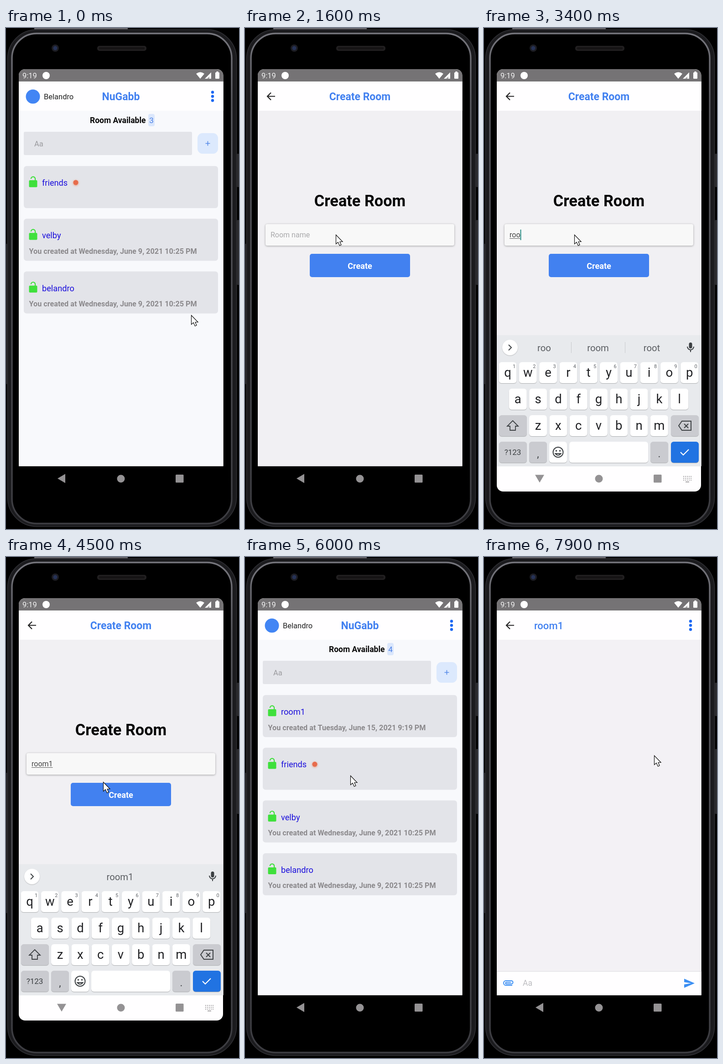
An HTML page with a canvas for the animation above (8000 ms loop, 511 by 1096 pixels).

```html
<!DOCTYPE html>
<html lang="en">
<head>
<meta charset="utf-8">
<style>
html, body { margin: 0; height: 100%; overflow: hidden; background: #000; }
canvas { display: block; }
</style>
</head>
<body>
<canvas id="stage" width="511" height="1096"></canvas>
<script>
const g = document.getElementById("stage").getContext("2d");
const LOOP = 8000, STEP = 100;
const BLUE = "#4281f0", INK = "#3c4043", CARD = "#e3e4e9";

const clamp = v => Math.max(0, Math.min(1, v));
const easeOut = v => 1 - (1 - clamp(v)) ** 3;

function box(x, y, w, h, r, fill, stroke, width = 1) {
  g.beginPath();
  g.roundRect(x, y, w, h, r);
  if (fill) { g.fillStyle = fill; g.fill(); }
  if (stroke) { g.strokeStyle = stroke; g.lineWidth = width; g.stroke(); }
}
function dot(x, y, r, fill) {
  g.beginPath();
  g.arc(x, y, r, 0, 7);
  g.fillStyle = fill;
  g.fill();
}
function text(s, x, y, size, fill, weight = 400, align = "left") {
  g.font = `${weight} ${size}px Roboto, sans-serif`;
  g.textAlign = align;
  g.fillStyle = fill;
  g.fillText(s, x, y);
}
// SVG path drawn around (x, y)
function icon(d, x, y, fill, stroke, width = 2) {
  const path = new Path2D(d);
  g.save();
  g.translate(x, y);
  if (fill) { g.fillStyle = fill; g.fill(path); }
  if (stroke) { g.strokeStyle = stroke; g.lineWidth = width; g.stroke(path); }
  g.restore();
}
function shadow(color, blur, y, draw) {
  g.save();
  g.shadowColor = color;
  g.shadowBlur = blur;
  g.shadowOffsetY = y;
  draw();
  g.restore();
}
function clipped(x, y, w, h, r, draw) {
  g.save();
  g.beginPath();
  g.roundRect(x, y, w, h, r);
  g.clip();
  draw();
  g.restore();
}

// ---- phone ----
const rim = g.createLinearGradient(0, 0, 0, 1096);
rim.addColorStop(0, "#77777e");
rim.addColorStop(0.15, "#56565c");
rim.addColorStop(1, "#3c3c41");

function phone() {
  g.fillStyle = "#000";
  g.fillRect(0, 0, 511, 1096);
  box(62, 0, 205, 3, 0, "#6c6b70");
  box(506, 275, 6, 73, 2, "#2b2b2e");
  box(506, 420, 6, 142, 2, "#2b2b2e");
  box(0, 472, 3, 307, 1, "#232326");
  box(3.5, 3.5, 502, 1087, 64, "#1b1b1e", "#2b2b2f", 2);
  box(13, 12, 482, 1072, 54, "#000", rim, 3.5);
  dot(108, 44, 8, "#1d1d23");
  dot(108, 44, 4.5, "#263256");
  box(200, 39, 108, 11, 5, "#211f20");
  box(204, 42, 100, 5, 2, "#161415");
}
function statusBar() {
  g.fillStyle = "#757375";
  g.fillRect(28, 90, 449, 27);
  text("9:19", 36, 110, 16.5, "#f2f2f2");
  dot(88, 104, 8, "#fff");
  icon("M0 7 L-9 -4 Q0 -11 9 -4 Z", 426, 104, "#fff");
  icon("M0 0 V-14 L-14 0 Z", 450, 111, "#fff");
  icon("M0 0 L5 -5 V0 Z", 441, 111, "#aaa8aa");
  box(459, 97, 9, 14, 1.5, "#fff");
  box(461.5, 95, 4, 3, 0, "#fff");
}

// ---- app screens ----
const CREATED = "You created at Wednesday, June 9, 2021 10:25 PM";
const ROOMS = [
  { name: "friends", unread: true },
  { name: "velby", note: CREATED },
  { name: "belandro", note: CREATED },
];
const NEW_ROOM = { name: "room1", note: "You created at Tuesday, June 15, 2021 9:19 PM" };

function header(background) {
  g.fillStyle = background;
  g.fillRect(28, 117, 449, 842);
  g.fillStyle = "#fffeff";
  g.fillRect(28, 117, 449, 64);
}
function menuDots() {
  for (const y of [140.5, 149.5, 158.5]) dot(453, y, 3.2, "#1b67f3");
}
function backArrow() {
  icon("M9 0 H-7 M0 -8 L-8 0 L0 8", 57, 149.5, null, "#222", 2.2);
}
function roomCard(room, y, pressed) {
  box(39, y, 426, 92, 6, CARD);
  g.save();
  if (pressed) g.globalAlpha *= 0.8;
  box(50.5, y + 31, 18, 15.2, 2, "#3fe03c");
  icon("M-4.6 -3 A4.6 4.6 0 0 1 4.6 -3 V1", 59.5, y + 31, null, "#3fe03c", 2.2);
  text(room.name, 79, y + 43, 18.2, "#1c10dc");
  if (room.unread) shadow("#f0906c", 4, 1, () => dot(153, y + 36, 5.5, "#e76c4c"));
  if (room.note) text(room.note, 50.5, y + 76.5, 16.2, "#8b898c", 700);
  g.restore();
}
function home(t) {
  const rooms = t > 5500 ? [NEW_ROOM, ...ROOMS] : ROOMS;
  header("#f8f9fc");
  dot(59, 150, 15.5, "#4285f4");
  text("Belandro", 83, 156, 16.5, "#222");
  text("NuGabb", 252, 158, 23, BLUE, 700, "center");
  menuDots();
  text("Room Available", 184, 208, 17.5, "#080808", 700);
  box(312, 188, 14, 27, 4, "#dbe7fc");
  text(rooms.length, 319, 208, 17, "#4b80e6", 400, "center");
  box(39, 227, 369, 51, 3, CARD);
  text("Aa", 62, 259, 16.5, "#9b9b9f");
  box(420, 230, 45, 45, 11, "#dce9fd");
  icon("M-5 0 H5 M0 -5 V5", 442.5, 252.5, null, "#5388e8", 1.6);
  rooms.forEach((room, i) => roomCard(room, 302 + i * 115.3, i === 0 && t >= 7000 && t < 7200));
}

const KEY_TIMES = [2800, 3200, 3400, 3700, 3900];
const typedCount = t => KEY_TIMES.filter(k => t >= k).length;

function createRoom(t) {
  const n = typedCount(t), typed = "room1".slice(0, n);
  header("#f1f0f3");
  backArrow();
  text("Create Room", 252, 158, 23, BLUE, 700, "center");
  text("Create Room", 252, 390, 34.3, "#050505", 700, "center");
  shadow("#0005", 4, 1, () => box(45, 429, 414, 47, 4, "#f8f8f8"));
  text(typed || "Room name", 56, 458, 16, n ? "#444" : "#a9a9ab");
  const width = n ? g.measureText(typed).width : 0;
  if (n) box(56, 460, width, 1, 0, "#555");
  const lastKey = n ? KEY_TIMES[n - 1] : 1900;
  if (t >= 1900 && (t - lastKey) % 1000 < 500) box(56 + width, 441, 2, 23, 0, "#2b8f86");
  box(142, 494, 220, 51, 5, BLUE);
  text("Create", 252, 527, 18.1, "#fff", 700, "center");
}
function chat() {
  header("#f3f1f5");
  backArrow();
  text("room1", 110, 158, 22, BLUE, 500);
  menuDots();
  box(28, 907, 449, 52, 0, "#fffeff");
  box(28, 906, 449, 1, 0, "#dcdbde");
  icon("M9 5 H-5 A5 5 0 0 1 -5 -5 H7 A3.5 3.5 0 0 1 7 2 H-4 A1.5 1.5 0 0 1 -4 -1.5 H6", 53, 932, null, "#3c8ff3", 2);
  text("Aa", 85, 938, 17.5, "#bcbcc0");
  icon("M-11 -10 L12 0 L-11 10 V2.5 L4 0 L-11 -2.5 Z", 450, 932.5, "#3c8ff3");
}

function layer(draw, t, scale, alpha) {
  g.save();
  g.globalAlpha = alpha;
  g.translate(252, 533);
  g.scale(scale, scale);
  g.translate(-252, -533);
  draw(t);
  g.restore();
}
// p: 0 shows the lower screen, 1 the upper one; a closing upper screen vanishes at once
function stack(lower, upper, p, t, closing) {
  if (p < 1) layer(lower, t, 1 + 0.075 * p, clamp((1 - p) / 0.29));
  if (!closing && p > 0.75) layer(upper, t, 0.85 + 0.15 * p, clamp((p - 0.75) / 0.125));
}
function screens(t) {
  g.fillStyle = "#fafafa";
  g.fillRect(28, 90, 449, 869);
  if (t < 5180) stack(home, createRoom, easeOut((t - 1060) / 400), t);
  else if (t < 7300) stack(home, createRoom, 1 - easeOut((t - 5181) / 400), t, true);
  else stack(home, chat, easeOut((t - 7360) / 400), t);
}

// ---- keyboard ----
const SUGGESTIONS = [[], ["r", "right", "really"], ["ro", "room", "round"],
  ["roo", "room", "root"], ["room", "rooms", "roommate"], ["", "room1", ""]];

function key(x, y, w, fill = "#fff") {
  shadow("#0004", 1, 1, () => box(x, y, w, 46, 6, fill));
}
function letters(row, x, y, upper) {
  [...row].forEach((c, i) => {
    const cx = x + i * 44.3;
    key(cx - 19.5, y, 39);
    text(upper ? c.toUpperCase() : c, cx, y + (upper ? 33 : 32), 27.5, "#202124", 400, "center");
    if (row.length === 10) text((i + 1) % 10, cx + 14, y + 13, 11, "#5f6368", 400, "center");
  });
}
function toolbar(t, n) {
  shadow("#0003", 2, 1, () => dot(57, 699, 17, "#fff"));
  icon(n ? "M-3 -6 L3 0 L-3 6" : "M3 -6 L-3 0 L3 6", 57, 699, null, INK);
  box(449.5, 688, 7, 13, 3.5, INK);
  icon("M-7 -2 A7 7 0 0 0 7 -2 M0 5 V10", 453, 699, null, INK);
  if (n) {
    if (t < 5200) SUGGESTIONS[n].forEach((s, i) => text(s, 132 + i * 118, 707, 20.3, "#5b5e62", 400, "center"));
    if (n < 5) for (const x of [191, 309]) box(x, 687, 1, 24, 0, "#c8cacd");
    return;
  }
  icon("M3 3 L10 10 M5 -3 A6 6 0 1 1 -7 -3 A6 6 0 1 1 5 -3", 115, 698, null, "#55585c", 2.3);
  icon("M-8 -9 H8 V3 L3 9 H-8 Z M8 3 H3 V9 M-4 1 Q0 6 4 1 M-4 -4 H-2 M2 -4 H4", 179, 698, null, "#55585c");
  text("GIF", 243, 704, 16, "#55585c", 900, "center");
  icon("M-8 -8 H8 V10 H-8 Z M-4 -1 H4 M-4 3 H4 M-4 6 H2", 309, 698, null, "#55585c");
  box(304, 687, 10, 6, 1, "#55585c");
  box(348, 686, 1, 25, 0, "#cfd1d4");
  for (const x of [382, 389, 396]) dot(x, 699, 2.4, "#55585c");
}
function keyboard(t) {
  const n = typedCount(t), grey = "#cacbd0";
  g.fillStyle = "#e8eaed";
  g.fillRect(28, 672, 449, 287);
  g.fillStyle = "#fffeff";
  g.fillRect(28, 959, 449, 160);
  toolbar(t, n);
  letters("qwertyuiop", 52, 731, !n);
  letters("asdfghjkl", 74.3, 789, !n);
  letters("zxcvbnm", 118.5, 847, !n);
  key(33, 847, 61, grey);
  icon("M0 -11 L12 1 H6 V10 H-6 V1 H-12 Z", 63, 870, n ? null : INK, INK, 1.8);
  key(410, 847, 61, grey);
  icon("M-14 0 L-7 -10 H13 V10 H-7 Z M-2 -4 L7 5 M7 -4 L-2 5", 441, 870, null, INK);
  key(33, 905, 61, grey);
  text("?123", 63, 934, 17, INK, 400, "center");
  key(99, 905, 39, grey);
  text(",", 118.5, 939, 22, INK, 400, "center");
  key(143, 905, 39);
  icon("M11 0 A11 11 0 1 1 -11 0 A11 11 0 1 1 11 0 M-6 3 Q0 10 6 3 Z", 162.5, 928, null, INK);
  dot(158.5, 925, 1.8, INK);
  dot(166.5, 925, 1.8, INK);
  key(187, 905, 173);
  key(365, 905, 39, grey);
  text(".", 384.5, 939, 22, INK, 400, "center");
  key(410, 905, 61, "#2173e2");
  icon("M-9 0 L-3 6 L9 -6", 440, 928, null, "#fff", 2.2);
}
function keyboardAndNav(t) {
  const hiding = t >= 5160;
  const shown = hiding ? clamp(1 - (t - 5160) / 130) : easeOut((t - 1860) / 300);
  if (shown > 0) clipped(28, 90, 448, 924, 14, () => {
    g.save();
    g.globalAlpha = shown;
    g.translate(0, 110 * (1 - shown));
    keyboard(t);
    g.restore();
    g.fillStyle = `rgba(0,0,0,${0.8 * (1 - shown)})`;
    g.fillRect(28, 958, 449, 56);
  });
  const grey = hiding && shown ? "#c4c4c4" : "#949294";
  const turn = hiding ? 90 - 270 * clamp((t - 5160) / 120) : 180 - 90 * easeOut((t - 1850) / 800);
  g.save();
  g.translate(122, 985.5);
  g.rotate(turn * Math.PI / 180);
  icon("M9 0 L-8 -10 V10 Z", 0, 0, grey);
  g.restore();
  dot(252, 986, 8.5, grey);
  box(372, 977, 17.5, 17.5, 1.5, grey);
  if (shown > 0.9) {
    for (let i = 0; i < 15; i++) box(437 + i % 5 * 4, 980 + Math.floor(i / 5) * 4, 2, 2, 0, "#a5a3a5");
    box(442, 992, 8, 2, 0, "#a5a3a5");
  }
}

// ---- mouse pointer: time, x, y ----
const POINTER = [[0, 406, 628], [900, 441, 241], [1000, 441, 241], [1600, 199, 452], [1800, 198, 452],
  [4200, 198, 452], [4500, 213, 492], [5100, 214, 514], [5300, 214, 514], [6000, 231, 478],
  [6700, 181, 339], [7400, 181, 339], [7900, 373, 434], [LOOP, 373, 434]];

function pointer(t) {
  const i = POINTER.findIndex(p => p[0] > t);
  const [t0, x0, y0] = POINTER[i - 1], [t1, x1, y1] = POINTER[i];
  const u = (t - t0) / (t1 - t0), s = u * u * (3 - 2 * u);
  icon("M.5 .5 V20.5 L5 16.5 L8.5 24 L12 22.5 L9 15.5 H15 Z", x0 + (x1 - x0) * s, y0 + (y1 - y0) * s, "#fff", "#111", 1.2);
}

function draw(now) {
  const t = Math.floor(now % LOOP / STEP) * STEP;
  phone();
  clipped(28, 90, 448.5, 868.5, [14, 14, 0, 0], () => {
    screens(t);
    statusBar();
  });
  keyboardAndNav(t);
  pointer(t);
  requestAnimationFrame(() => draw(performance.now() - start));
}
const start = performance.now();
draw(0);
</script>
</body>
</html>
```
